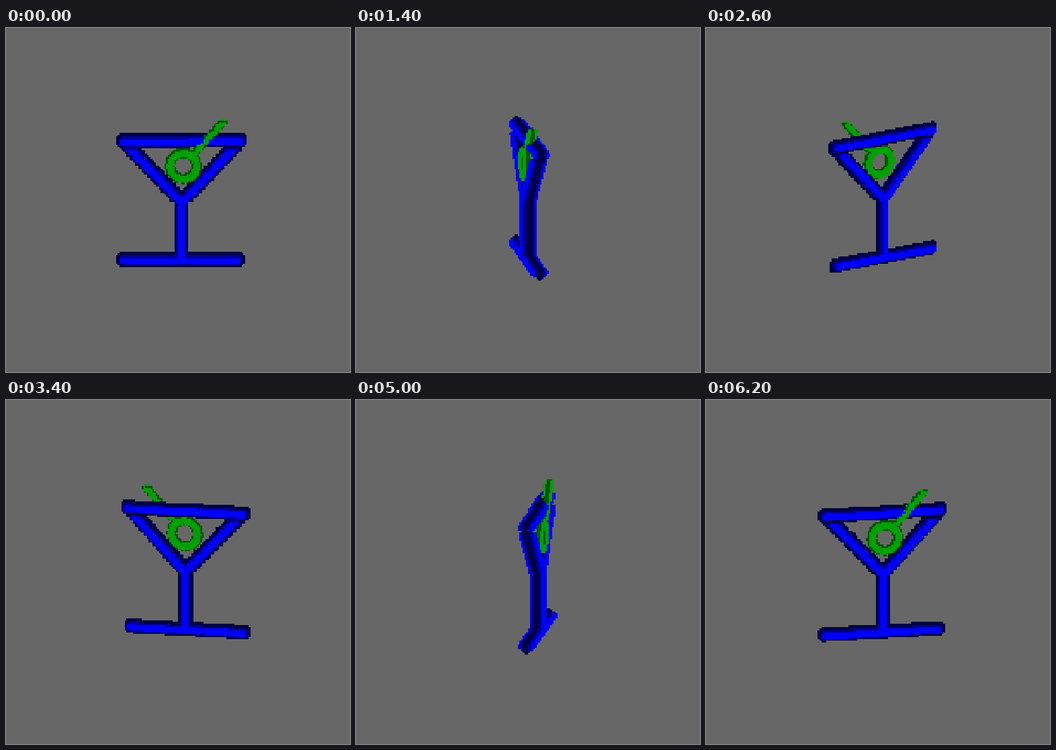
Animation, 512 px wide and 512 px high, one loop 6400 ms. Source, as an HTML page with a canvas:

```html
<!DOCTYPE html>
<html lang="en">
<head>
<meta charset="utf-8">
<title>Turning cocktail glass</title>
<style>
html, body { margin: 0; width: 100%; height: 100%; overflow: hidden; background: #676767; }
canvas { display: block; width: 512px; height: 512px; image-rendering: pixelated; }
</style>
</head>
<body>
<canvas id="stage" width="200" height="200"></canvas>
<script>
const SIZE = 200, SCALE = 512 / SIZE;
const STEP = 200, STEPS = 32;
const AXIS_X = 264, MID_Y = 256;
const TILT_SIN = 0.28, TILT_COS = 0.96;
const BACKGROUND = [103, 103, 103];
const STAIR = 4.6;

// Each layer is [half width, depth]; shades colour the bands between layers.
// The back half mirrors the front half.
function tube(front, shades) {
  const back = front.slice(0, -1).reverse().map(([d, z]) => [d, -z]);
  return { layers: [...front, ...back], shades: [...shades, ...shades.slice().reverse()] };
}

const BLUE = tube(
  [[3, 12.5], [5, 8.5], [7, 5], [11, 0]],
  [[0, 0, 255], [0, 0, 150], [0, 0, 70]]
);
const GREEN = tube(
  [[4.5, 6.5], [5.5, 3.5], [8, 0]],
  [[0, 160, 0], [0, 84, 0]]
);

const faces = [];

// Joins the outlines of all layers into a closed solid.
function loft({ layers, shades }, depth, outline) {
  const loops = layers.map(([d, z]) => outline(d).map(([x, y]) => [x, y, z + depth]));
  faces.push({ points: loops[0], shade: shades[0] });
  faces.push({ points: loops[loops.length - 1], shade: shades[0] });
  shades.forEach((shade, i) => {
    const a = loops[i], b = loops[i + 1];
    a.forEach((p, k) => {
      const next = (k + 1) % a.length;
      faces.push({ points: [p, a[next], b[next], b[k]], shade });
    });
  });
}

// Level bar with clipped corners.
function bar(profile, depth, x1, x2, y) {
  loft(profile, depth, d => {
    const c = d * 0.6;
    return [
      [x1 - c, y - d], [x2 + c, y - d], [x2 + d, y - c], [x2 + d, y + c],
      [x2 + c, y + d], [x1 - c, y + d], [x1 - d, y + c], [x1 - d, y - c]
    ];
  });
}

function post(profile, depth, x, y1, y2, widen = 1) {
  loft(profile, depth, d => {
    const w = d * widen;
    return [[x - w, y1], [x + w, y1], [x + w, y2], [x - w, y2]];
  });
}

// Slanted line built from short stacked posts.
function stairs(profile, depth, x1, y1, x2, y2, widen) {
  const count = Math.round((y2 - y1) / STAIR);
  const height = (y2 - y1) / count;
  for (let i = 0; i < count; i++) {
    const x = x1 + (x2 - x1) * (i + 0.5) / count;
    post(profile, depth, x, y1 + i * height, y1 + (i + 1) * height, widen);
  }
}

function ring(profile, depth, cx, cy, radius, sides) {
  const at = (r, i) => {
    const a = i * 2 * Math.PI / sides;
    return [cx + r * Math.cos(a), cy + r * Math.sin(a)];
  };
  for (let i = 0; i < sides; i++) {
    loft(profile, depth, d => [
      at(radius + d, i), at(radius + d, i + 1),
      at(radius - d, i + 1), at(radius - d, i)
    ]);
  }
}

bar(BLUE, 7, -89, 4, -94);
bar(BLUE, 5, 4, 84, -94);
stairs(BLUE, 7, -79, -83, -2.4, 0, 1.38);
stairs(BLUE, 7, 74, -83, -2.4, 0, 1.38);
post(BLUE, 7, -2.4, -4, 90);
bar(BLUE, 7, -89, 80, 90);
ring(GREEN, 12, 0, -56.5, 20.3, 12);
stairs(GREEN, 12.5, 60, -126, 16, -76, 0.95);

const context = document.getElementById("stage").getContext("2d");
const image = context.createImageData(SIZE, SIZE);
const nearest = new Float32Array(SIZE * SIZE);

function project([x, y, z], cos, sin) {
  const near = z * cos + x * sin;
  return [
    (AXIS_X + x * cos - z * sin) / SCALE,
    (MID_Y + y * TILT_COS + near * TILT_SIN) / SCALE,
    near * TILT_COS - y * TILT_SIN
  ];
}

function setPixel(index, color) {
  image.data.set(color, index * 4);
  image.data[index * 4 + 3] = 255;
}

function fillTriangle(a, b, c, color) {
  const area = (b[0] - a[0]) * (c[1] - a[1]) - (b[1] - a[1]) * (c[0] - a[0]);
  if (Math.abs(area) < 1e-6) return;
  const low = k => Math.max(0, Math.floor(Math.min(a[k], b[k], c[k])));
  const high = k => Math.min(SIZE - 1, Math.ceil(Math.max(a[k], b[k], c[k])));
  const left = low(0), right = high(0), bottom = high(1);
  for (let y = low(1); y <= bottom; y++) {
    for (let x = left; x <= right; x++) {
      const px = x + 0.5 - a[0], py = y + 0.5 - a[1];
      const v = (px * (c[1] - a[1]) - py * (c[0] - a[0])) / area;
      const w = (py * (b[0] - a[0]) - px * (b[1] - a[1])) / area;
      if (v < 0 || w < 0 || v + w > 1) continue;
      const z = a[2] + v * (b[2] - a[2]) + w * (c[2] - a[2]);
      const index = y * SIZE + x;
      if (z > nearest[index]) {
        nearest[index] = z;
        setPixel(index, color);
      }
    }
  }
}

function draw(step) {
  const angle = step / STEPS * 2 * Math.PI;
  const cos = Math.cos(angle), sin = Math.sin(angle);
  nearest.fill(-1e9);
  for (let i = 0; i < SIZE * SIZE; i++) setPixel(i, BACKGROUND);
  for (const { points, shade } of faces) {
    const flat = points.map(p => project(p, cos, sin));
    for (let k = 2; k < flat.length; k++) fillTriangle(flat[0], flat[k - 1], flat[k], shade);
  }
  context.putImageData(image, 0, 0);
}

let shown = -1;
const start = performance.now();

function tick() {
  const step = Math.floor((performance.now() - start) / STEP) % STEPS;
  if (step !== shown) {
    shown = step;
    draw(step);
  }
  requestAnimationFrame(tick);
}
tick();
</script>
</body>
</html>
```
